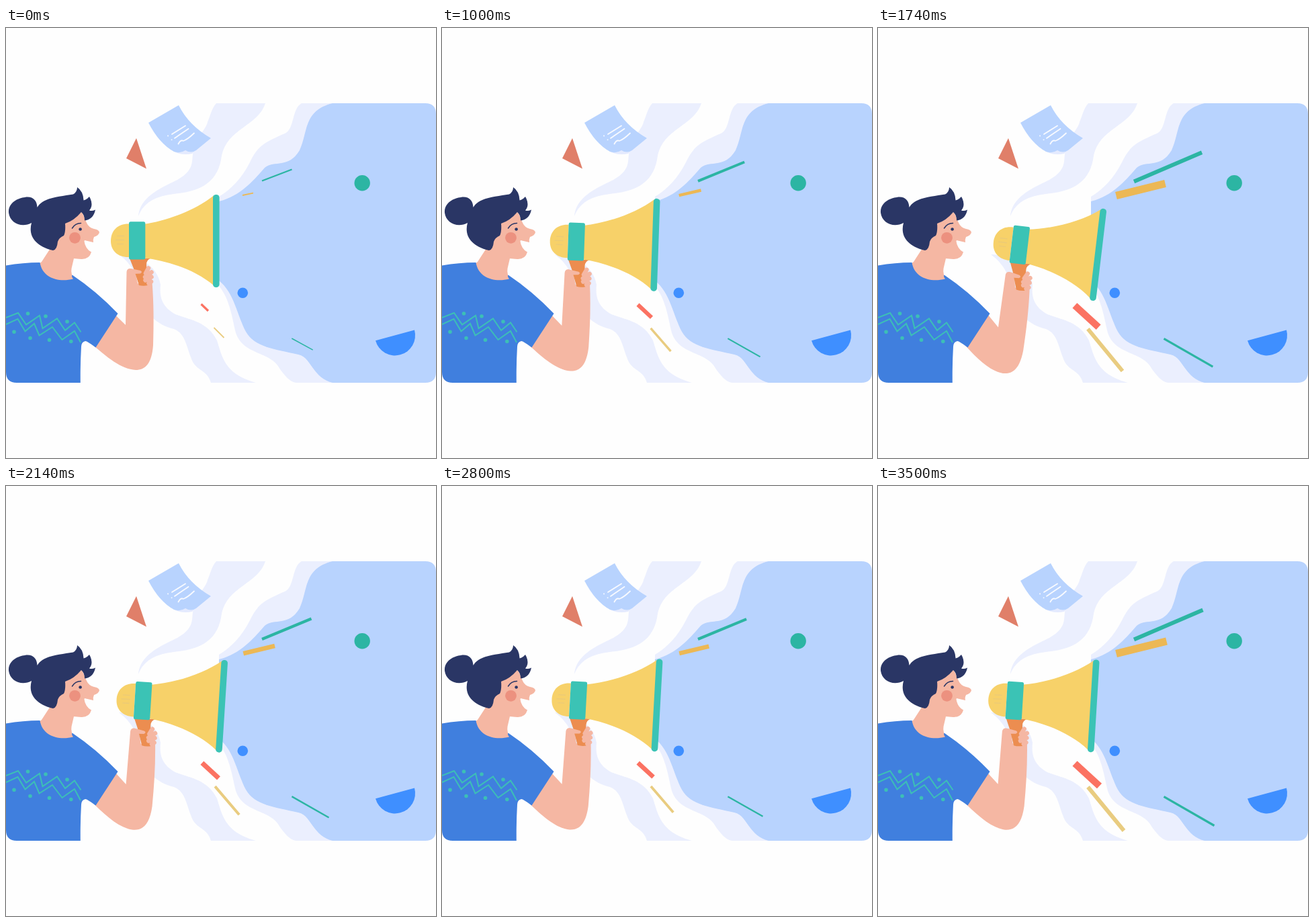
These frames come from a looping animation (640x640 px, 3.52 s). An HTML page:

```html
<!DOCTYPE html>
<html lang="en">
<head>
<meta charset="utf-8">
<title>Megaphone call</title>
<style>
  html, body { margin: 0; width: 100%; height: 100%; overflow: hidden; background: #fefefe; }
  svg { display: block; width: 100vw; height: 100vh; }
</style>
</head>
<body>
<svg viewBox="0 0 640 640">
  <!-- background waves -->
  <g fill="#ebeffe">
    <path d="M313 112H386C376 145 329 150 321 190C316 230 290 243 250 247C215 251 203 265 197 280C199 250 235 236 255 226C283 210 275 197 279 183C285 160 298 150 300 140C305 128 306 120 313 112Z"/>
    <path d="M168 337C195 338 225 352 230 382C228 400 232 415 252 426C275 435 300 437 314 465C322 490 325 515 372 528H305C300 510 285 510 278 497C268 475 268 455 250 448C225 442 205 425 200 395C196 365 185 350 168 337Z"/>
    <path d="M440 112H500V528H432C422 527 415 517 408 508C395 480 350 488 341 450C335 420 330 400 317 384V251C335 240 350 225 363 200C375 175 385 170 415 157C430 150 425 120 440 112Z"/>
  </g>
  <path fill="#b8d3fe" d="M486 112H624Q640 112 640 128V512Q640 528 624 528H486C455 520 455 490 435 486C400 478 370 475 357 452C343 425 340 395 317 376V258C350 250 370 225 385 208C400 196 420 210 437 182C450 155 442 123 486 112Z"/>

  <!-- loose shapes -->
  <path fill="#e07f69" d="M194 164L209 209.5L179 194Z"/>
  <path fill="#e4eafe" d="M250 184Q262 190 277 187L283 181L262 178Z"/>
  <path fill="#b8d3fe" d="M212 141L257 115Q272 145 305 164L283 182Q275 187 267 182Q260 187 250 184Q228 172 212 141Z"/>
  <g fill="none" stroke="#f8faff" stroke-width="1.8" stroke-linecap="round">
    <path d="M247 158L267 145.500M251 164L271.500 150M256.500 172.500Q260 166 264 168Q270 166 280 156.500M241 160.500h.2M246.500 166.300h.2"/>
  </g>
  <circle cx="530.2" cy="230.700" r="11.700" fill="#2cb5a3"/>
  <circle cx="352.300" cy="394.300" r="7.800" fill="#3f8fff"/>
  <path fill="#3f8fff" d="M550 465.300L608 449.500A30 30 0 0 1 550 465.300Z"/>
  <g id="rays" fill="none"></g>

  <!-- arm and megaphone -->
  <g id="arm">
    <path fill="#f5b7a3" d="M145 410L178 442L179.500 363Q180 358 185 358L192 360L196 380L205 383L217.500 378C220 410 220 440 219 472C217 500 207 509 193 509C172 508 150 490 125 468Z"/>
    <path fill="#ec8d50" d="M184 343L216 342.500Q209 345 209 352L211 383Q204 384.500 198 383L190 358Z"/>
    <path fill="#f5b7a3" d="M180 363Q181 357 188 358.500L200 361Q204 363 200 365.500L190 366L182 370Z"/>
    <g stroke="#f5b7a3" stroke-width="6.500" stroke-linecap="round">
      <path d="M212 357.500L208 365M216.500 363.500L207 370.500M216.500 370.500L207.500 375.500M216 377.500L212.500 380"/>
    </g>
    <path fill="#f7d169" d="M183 291.500C167 291 156 301 156 317C156 332 167 341.500 183 341Z"/>
    <path fill="none" stroke="#ebca77" stroke-width="1.300" d="M165 309.500H176M163 315.500H176M165 321.500H175"/>
    <path fill="#f7d169" d="M205 292C240 287 282 271 309 249.500V383C282 360 243 347 205 342Z"/>
    <rect x="183" y="288.200" width="24.300" height="56.300" rx="2.500" fill="#3bc3b5"/>
    <rect x="308" y="248" width="9.600" height="138" rx="4.500" fill="#3bc3b5"/>
  </g>

  <!-- woman -->
  <path fill="#f5b7a3" d="M66 328L53 348L48 352C55 374 78 380 102 374Q96 367 97.500 358L101 343L112 325L117 316L130 319Q129 315 131 311Q138 309 139 304Q138 300 131 299Q123 297 120 290L113 274L88 284L78 312Z"/>
  <path id="jaw" fill="#f5b7a3" d="M116 315.500Q118 329 127 333.500Q124 344.500 112 344L100 343L92 322Z"/>
  <path fill="#2a3665" d="M46.500 267C46 255 38 250 28 252C12 254 3 264 4 275C6 291 24 298 38 290C33 308 42 324 70 331Q76 330 77 318Q79 312 86 309Q89 303 88 291Q101 287 112 274Q117 278 117 286.500Q130 285 133 270.500Q128 273 124 271.500Q131 263 124 251Q121 255 115.500 256.500Q115 243 106 237Q106 244 100 247.500C80 251 55 252 46.500 267Z"/>
  <circle cx="102.500" cy="312.300" r="8.400" fill="#ec917f"/>
  <circle cx="110.600" cy="299.500" r="2.300" fill="#2a3665"/>
  <path fill="none" stroke="#2a3665" stroke-width="1.500" stroke-linecap="round" d="M98.500 298Q103 290.500 111.500 290.500"/>
  <path fill="#407fde" d="M0 353.500Q25 349 50.500 349C54 372 78 379 100 373.500Q97 370 98.500 367.500Q135 392 166.500 425L133.500 475.500Q121 466 118 466Q112.500 467 112 474Q110.500 500 110.800 528H16Q0 528 0 512Z"/>
  <g fill="none" stroke="#3cbfb6" stroke-width="2">
    <path d="M0 431L18 424L30 441.500L50 428L54.500 447L76 432.500L88 450L102 438.500L111.500 452.500"/>
    <path d="M0 441L17.500 433L28.500 451.500L42 440L49.500 457.500L69 445L83.500 464L102 451L111 468"/>
  </g>
  <path stroke="#3cbfb6" stroke-width="5.600" stroke-linecap="round" d="M32.500 425h.01M59 429h.01M91 437h.01M12 452.300h.01M36 461.500h.01M64.500 464.300h.01M96.800 466.500h.01"/>
</svg>
<script>
const LOOP = 3520, STEP = 20;
const lerp = (a, b, p) => a + (b - a) * p;
const smooth = p => p * p * (3 - 2 * p);

// Eases between 0 and 1 alternately at the key times (in steps), then holds.
function swing(keys, f) {
  if (f <= keys[0]) return 0;
  for (let i = 1; i < keys.length; i++) {
    if (f < keys[i]) {
      const e = smooth((f - keys[i - 1]) / (keys[i] - keys[i - 1]));
      return i % 2 ? e : 1 - e;
    }
  }
  return (keys.length - 1) % 2;
}

const armKeys = [0, 28, 62, 90, 125, 157, 193];
const lowKeys = [0, 35, 61, 91, 125, 156];

// Each ray: short and long form as [x1, y1, x2, y2, width].
const rays = [
  { color: '#2cb5a3', keys: [0, 28, 68, 89, 125, 156],
    from: [381, 227.5, 425.5, 210.5, 2.4], to: [381, 228.5, 483.5, 184.5, 6] },
  { color: '#ecb855', keys: [0, 28, 62, 90, 125, 156],
    from: [352, 249, 368, 245.7, 1.8], to: [354.5, 249.5, 429.5, 231, 11.5] },
  { color: '#fb7262', keys: lowKeys,
    from: [290.5, 411, 301, 421, 3.2], to: [293, 413, 329.5, 446.5, 10.5] },
  { color: '#e9cc80', keys: lowKeys,
    from: [309.5, 446, 324.5, 461, 1.8], to: [312.5, 448, 366, 513, 6] },
  { color: '#2cb5a3', keys: lowKeys,
    from: [425.3, 462, 456.7, 479.2, 1.5], to: [425.5, 462.3, 500.5, 505.5, 3.2] }
];

const byId = id => document.getElementById(id);
const arm = byId('arm'), jaw = byId('jaw');
for (const r of rays) {
  r.el = document.createElementNS('http://www.w3.org/2000/svg', 'line');
  r.el.setAttribute('stroke', r.color);
  byId('rays').append(r.el);
}

function draw(ms) {
  const f = Math.floor((ms % LOOP) / STEP);
  arm.setAttribute('transform', `rotate(${7 * swing(armKeys, f)} 148 452)`);
  const shut = Math.max(swing([52, 62, 74], f), swing([113, 125, 137], f));
  jaw.setAttribute('transform', `rotate(${-5 * shut} 98 325)`);
  for (const r of rays) {
    const p = swing(r.keys, f);
    ['x1', 'y1', 'x2', 'y2', 'stroke-width'].forEach((name, i) =>
      r.el.setAttribute(name, lerp(r.from[i], r.to[i], p)));
  }
}

const start = performance.now();
function tick() {
  draw(performance.now() - start);
  requestAnimationFrame(tick);
}
tick();
</script>
</body>
</html>
```
